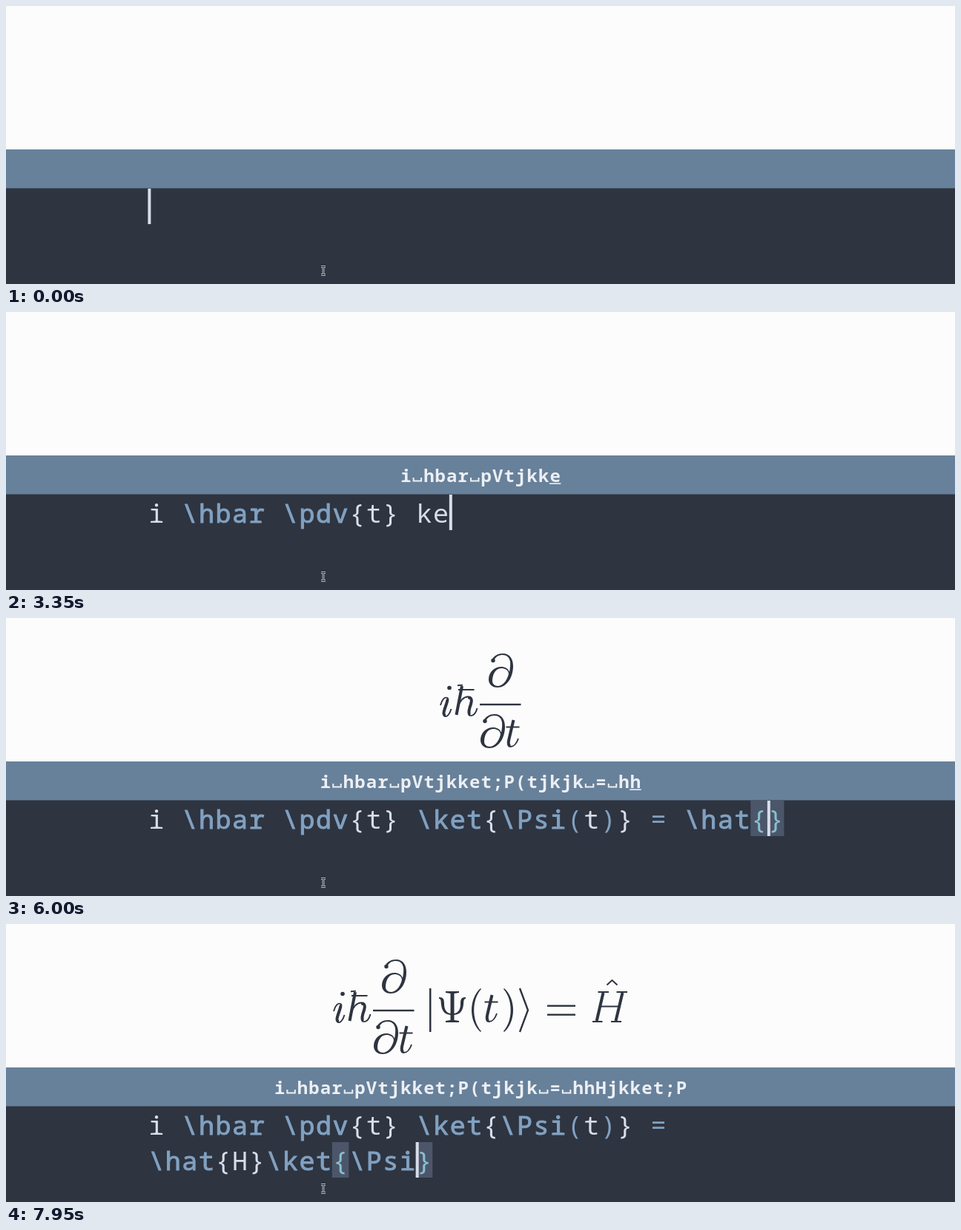
These frames come from a looping animation (1280 by 376 pixels, 8000 ms). An HTML page with a canvas:

```html
<!DOCTYPE html>
<html lang="en">
<head>
<meta charset="utf-8">
<title>Typing an equation</title>
<style>
html, body { margin: 0; width: 100%; height: 100%; overflow: hidden; background: #fcfcfc; }
canvas { display: block; }
</style>
</head>
<body>
<canvas id="stage" width="1280" height="376"></canvas>
<script>
const ctx = document.getElementById('stage').getContext('2d');
const LOOP = 8000, STEP = 50;
const MONO = '"Noto Sans Mono", "DejaVu Sans Mono", monospace';
const DARK = '#2e3440', FG = '#d8dee9', BLUE = '#81a1c1', TEAL = '#88c0d0', MATCH = '#4c566a';
const BAR = '#68819a', KEY = '#eceff4';

// Key presses and their times
const typed = 'i hbar pVtjkket;P(tjkjk = hhHjkket;P';
const times = [
  50, 850, 1000, 1180, 1400, 1440, 1600, 1790, 2000, 2300, 2600, 2690,
  3240, 3305, 3460, 3940, 4200, 4490, 4790, 4950, 5010, 5110, 5190, 5290,
  5440, 5550, 5690, 5810, 6150, 6480, 6560, 6755, 6870, 6980, 7300, 7640
];
const keys = [...typed].map((key, i) => ({ key, at: times[i] }));
const FIRST_ECHO = 980, LAG = 40, RECENT = 50, SHIFT_HOLD = 200;

// Trigger -> text before and after the cursor
const snippets = {
  hbar: ['\\hbar', ''],
  pV: ['\\pdv{', '} '],
  ket: ['\\ket{', '}'],
  hh: ['\\hat{', '}'],
  ';P': ['\\Psi', ''],
  '(': ['(', ')']
};

function editorAt(t) {
  let before = '', after = '', pending = false;
  for (const { key, at } of keys) {
    if (t < Math.max(at + LAG, FIRST_ECHO)) break;
    if (key === 'j') { pending = true; continue; }
    if (pending) {
      // "jk" jumps past the closing bracket
      const skip = after.match(/^[)}] ?/)[0];
      before += skip;
      after = after.slice(skip.length);
      pending = false;
      continue;
    }
    before += key;
    for (const trigger in snippets) {
      if (!before.endsWith(trigger)) continue;
      const [head, tail] = snippets[trigger];
      before = before.slice(0, -trigger.length) + head;
      after = tail + after;
      break;
    }
  }
  return { before, after, pending };
}

function matchPair(text, cursor) {
  const find = (i, dir) => {
    let depth = 0;
    for (; i >= 0 && i < text.length; i += dir) {
      if ('({'.includes(text[i])) depth += dir;
      if (')}'.includes(text[i])) depth -= dir;
      if (depth === 0) return i;
    }
    return -1;
  };
  for (const i of [cursor, cursor - 1]) {
    const c = text[i];
    if (!c || !'(){}'.includes(c)) continue;
    return [i, find(i, '({'.includes(c) ? 1 : -1)];
  }
  return [];
}

function rect(x, y, w, h, color) {
  ctx.fillStyle = color;
  ctx.fillRect(x, y, w, h);
}

function drawEditor(t) {
  const X0 = 191.4, Y0 = 247, CELL = 22.58, ROW = 48, WRAP = 42;
  const { before, after, pending } = editorAt(t);
  let text = before + after, cursor = before.length;
  const pair = matchPair(text, cursor);
  const commands = new Set();
  for (const m of text.matchAll(/\\[a-zA-Z]+/g))
    for (let i = 0; i < m[0].length; i++) commands.add(m.index + i);
  if (pending) {
    text = before + 'j' + after.slice(1);
    cursor++;
  }
  const split = text.length > WRAP ? text.lastIndexOf(' ', WRAP) + 1 : Infinity;
  const place = i => i < split
    ? [X0 + i * CELL, Y0]
    : [X0 + (i - split) * CELL, Y0 + ROW];

  ctx.textAlign = 'center';
  ctx.font = `400 35px ${MONO}`;
  ctx.lineWidth = 1;
  [...text].forEach((c, i) => {
    const [x, y] = place(i);
    const matched = pair.includes(i), command = commands.has(i);
    if (matched) rect(x, y, CELL, ROW, MATCH);
    ctx.fillStyle = ctx.strokeStyle =
      matched ? TEAL : command || '()='.includes(c) ? BLUE : FG;
    ctx.fillText(c, x + CELL / 2, y + 37.5);
    // A thin outline gives commands a semibold look
    if (command) ctx.strokeText(c, x + CELL / 2, y + 37.5);
  });
  const [cx, cy] = place(cursor);
  rect(cx, cy, 4, ROW, FG);
}

function drawKeys(t) {
  const CELL = 15.48, BASE = 230;
  const shown = keys.filter(k => k.at <= t);
  if (!shown.length) return;
  const last = shown[shown.length - 1];
  const released = /[A-Z(]/.test(last.key) && t - last.at > SHIFT_HOLD;
  const lineY = last.key === ' ' ? 235 : 231.3;
  const left = 640 - shown.length * CELL / 2;
  ctx.font = `700 24px ${MONO}`;
  ctx.textAlign = 'center';
  shown.forEach(({ key, at }, i) => {
    const x = left + i * CELL;
    if (key === ' ') {
      ctx.strokeStyle = KEY;
      ctx.lineWidth = 2;
      ctx.beginPath();
      ctx.moveTo(x + 2.5, 224);
      ctx.lineTo(x + 2.5, 228.5);
      ctx.lineTo(x + 13, 228.5);
      ctx.lineTo(x + 13, 224);
      ctx.stroke();
    } else {
      ctx.fillStyle = KEY;
      ctx.fillText(key, x + CELL / 2, BASE);
    }
    if (!released && last.at - at < RECENT) rect(x, lineY, CELL, 1.6, KEY);
  });
}

const partial = new Path2D(
  'M4 10C6 3 13 0 19 0C29 0 33 8 33 17C33 33 24 46 12 46C4 46 0 41 0 35C0 25 8 18 17 18' +
  'C22 18 26 20 28 25C29 20 29.5 15 29 11C28 5 24 2 19 2C14 2 10 4 8 8Z' +
  'M17 20C9 20 5 29 5 37C5 41 8 44 12.5 44C20 44 26 34 27 27C26 22 22 20 17 20Z');
const psi = new Path2D(
  'M9 0H27V2L20.5 3V30C27 29 29 23 29 17C29 11 30 8 36 8V10C33 10 33.5 14 33 18' +
  'C32 27 28 31.5 20.5 32V39L27 40V42H9V40L15.5 39V32C8 31.5 4 27 3 18C2.5 14 3 10 0 10V8' +
  'C6 8 7 11 7 17C7 23 9 29 15.5 30V3L9 2Z');
const paren = new Path2D('M12 0C-4 14 -4 45 12 59L13 58C0 44 0 15 13 1Z');

// Italic letters as thick stems and thin hairlines
const pen = (thick, thin) => ({ thick: new Path2D(thick), thin: new Path2D(thin) });
const letters = {
  i: pen('M9.5 17.8C13 19 5 33 5.5 38C5.8 40.5 7 41 8 41',
    'M1 27C3 19 7 15.5 10 17M7 42C10 43 13.5 39 15.5 32'),
  hbar: pen('M10 2L2.5 41M18 17.5C25 17 23 24 20.5 31C19 36 19 41 21.5 41',
    'M4 1.2L11 .6M4.5 30C8 21 13 16.5 18 16.5M21.5 42C25.5 43 29 38 30.5 32M5 7H26.5'),
  t: pen('M10.5 2L4.2 29C3 34 4 37 6.5 37',
    'M.5 11.5H18.5M6 38C11 38.5 15 33 17 27'),
  H: pen('M15 2L6.2 40M41 2L32 40',
    'M8 1H22.5M33 1H47.5M.5 41H14M25.5 41H39.5M10.5 20.5H37')
};

function shape(path, x, y, flip = 1) {
  ctx.save();
  ctx.translate(x, y);
  ctx.scale(flip, 1);
  ctx.fill(path, 'evenodd');
  ctx.restore();
}

function dot(x, y, r) {
  ctx.beginPath();
  ctx.arc(x, y, r, 0, Math.PI * 2);
  ctx.fill();
}

function letter(name, x, y) {
  ctx.save();
  ctx.translate(x, y);
  ctx.lineWidth = 4;
  ctx.stroke(letters[name].thick);
  ctx.lineWidth = 1.9;
  ctx.stroke(letters[name].thin);
  ctx.restore();
}

function line(width, ...points) {
  ctx.lineWidth = width;
  ctx.beginPath();
  points.forEach(([x, y]) => ctx.lineTo(x, y));
  ctx.stroke();
}

function drawPartial(x, y) {
  shape(partial, x, y);
  dot(x + 6, y + 9.5, 2.7);
}

function drawFormula(t) {
  if (t < 5050) return;
  const full = t >= 7200, x = full ? 441 : 585;
  ctx.fillStyle = ctx.strokeStyle = DARK;
  letter('i', x, 91);
  dot(x + 13, 94.5, 2.8);
  letter('hbar', x + 20, 90);
  drawPartial(x + 66, 48);
  rect(x + 54, 115.8, 55.5, 2.4, DARK);
  drawPartial(x + 55, 130);
  letter('t', x + 89, 136);
  if (!full) return;
  rect(571, 87, 2.5, 59, DARK);
  shape(psi, 584, 91);
  shape(paren, 628, 87);
  letter('t', 645, 94);
  shape(paren, 684, 87, -1);
  line(2.4, [693, 87], [704, 116.5], [693, 146]);
  rect(730, 109.5, 38, 2.4, DARK);
  rect(730, 121.5, 38, 2.4, DARK);
  letter('H', 790.5, 91);
  line(2, [810.5, 82.5], [817.5, 76], [824.5, 82.5]);
}

function drawPointer() {
  for (const [width, color] of [[2.8, '#c8ccd4'], [1, '#20242c']]) {
    ctx.strokeStyle = color;
    line(width, [425, 352.5], [431, 352.5]);
    line(width, [428, 352.5], [428, 363.5]);
    line(width, [425, 363.5], [431, 363.5]);
  }
}

function draw(now) {
  const t = Math.floor((now % LOOP) / STEP) * STEP;
  rect(0, 0, 1280, 194, '#fcfcfc');
  rect(0, 194, 1280, 53, BAR);
  rect(0, 246.5, 1280, 129.5, DARK);
  drawFormula(t);
  drawKeys(t);
  drawEditor(t);
  drawPointer();
}

const start = performance.now();
function tick() {
  draw(performance.now() - start);
  requestAnimationFrame(tick);
}
tick();
</script>
</body>
</html>
```
